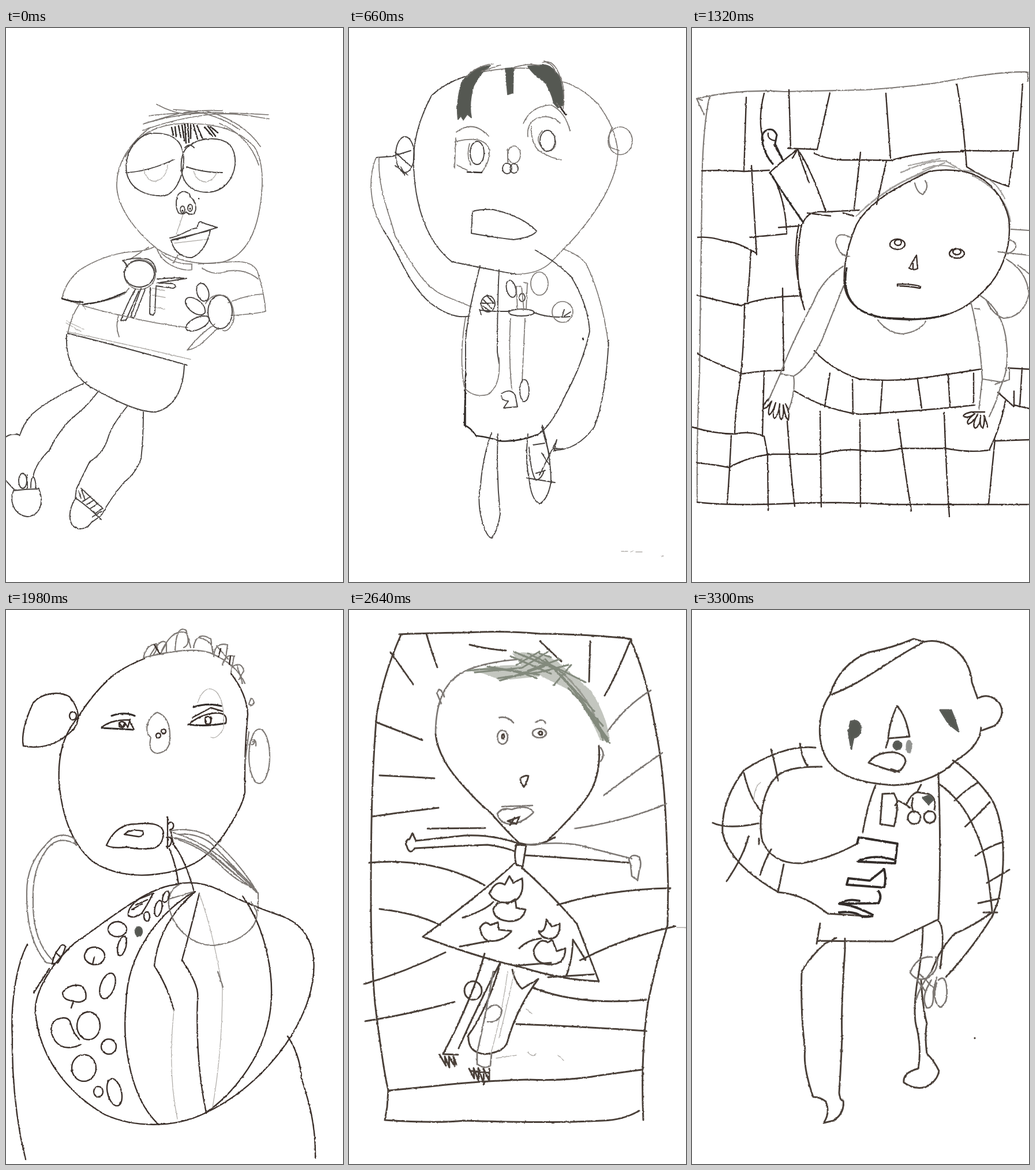
Write an HTML page without scripts that moves like this. It is 584 px wide and 958 px high and loops after 3.96 s.

```html
<!DOCTYPE html>
<html lang="en">
<head>
<meta charset="utf-8">
<title>Six pencil drawings</title>
<style>
html, body { margin: 0; width: 100%; height: 100%; overflow: hidden; background: #fff; }
svg { display: block; width: 584px; height: 958px; fill: none; stroke-linecap: round; stroke-linejoin: round; }
.page { --w: 1.9px; stroke: #47423f; stroke-width: var(--w); filter: url(#grain); visibility: hidden; animation: show 3960ms step-end infinite; animation-delay: calc((var(--i) - 6) * 660ms); }
@keyframes show { 0% { visibility: visible; } 16.666%, 100% { visibility: hidden; } }
.ink { --w: 2.4px; stroke: #3a2f2a; }
.crayon { --w: 3px; stroke: #4a4039; }
.light { stroke: #b2afab; stroke-width: 1.3px; }
.soft { stroke: #7d7874; stroke-width: calc(var(--w) * .9); }
.bold { stroke: #332d2a; stroke-width: calc(var(--w) * 1.3); }
.shade { fill: #555852; stroke: #5c5e59; }
.green { stroke: #838a7d; }
.wash { fill: #a3a89d; stroke: none; opacity: .65; }
</style>
</head>
<body>
<svg viewBox="0 0 584 958">
<filter id="grain" filterUnits="userSpaceOnUse" x="0" y="0" width="584" height="958" color-interpolation-filters="sRGB">
  <feTurbulence type="fractalNoise" baseFrequency=".2" numOctaves="2" seed="4"/>
  <feDisplacementMap in="SourceGraphic" scale="2.5" xChannelSelector="R" yChannelSelector="G"/>
</filter>

<!-- reclining figure -->
<g class="page" style="--i:0">
  <path class="soft" d="M250 172C215 198 190 235 192 275C194 310 222 350 262 382C290 400 330 411 370 406C412 398 432 360 440 310C448 260 443 225 430 205C405 178 370 165 310 165C270 166 250 178 240 184C225 195 215 210 207 222"/>
  <path class="soft" d="M261 132Q290 148 320 150M240 165C280 155 300 140 375 143M237 177C280 162 310 155 350 150S420 152 456 157M247 152Q320 142 455 150M345 143Q410 160 441 205M370 165Q420 185 438 237M238 166Q310 143 385 147M290 141Q360 143 405 176"/>
  <path class="bold" d="M287 172l3 13M293 171l2 17M299 169l4 20M305 168l4 27M310 167l2 32M315 166l2 32M320 168v23M325 168l7 24M331 169l9 21M344 171l13 15M350 170l13 17M355 171l12 10"/>
  <path d="M250 182C220 190 205 220 209 250C215 280 245 292 275 290C295 285 308 255 308 225C306 195 290 180 250 182M318 203C300 215 300 250 312 268C330 290 365 288 382 270C400 250 402 220 388 202C370 186 335 190 318 203M211 250Q250 247 292 227M313 240Q340 250 375 250M310 207q8-9 16 0"/>
  <path class="light" d="M238 243q6 22 20 22q20-4 22-28M325 247q5 19 22 19q14-3 19-18M307 322L295 357M292 372L352 365M253 450l22 4M254 462l22 4M255 482l20 4M105 507L135 521M133 478l5 9M105 525Q200 545 320 573M104 510L130 525"/>
  <path d="M297 290C305 278 315 282 320 292C328 300 332 312 326 321Q318 324 312 318Q308 324 299 320Q292 308 297 290"/>
  <ellipse cx="306" cy="314" rx="4" ry="6"/><ellipse cx="319" cy="311" rx="4" ry="6"/><path class="bold" d="M334 295h.1M306 315v1M319 312v1"/>
  <path d="M284 363C305 360 320 345 331 346Q334 330 341 337L366 345Q340 353 310 362L288 367M286 367C290 385 305 398 322 397C340 390 350 370 354 350L288 366"/>
  <path class="soft" d="M262 383Q270 405 295 414Q310 420 322 418V408Q290 409 270 390M298 393l-8 13M333 408Q385 404 402 404Q432 405 437 425Q447 455 450 490Q430 495 390 497M340 415Q360 430 385 420Q415 416 437 434M385 475Q420 461 446 460"/>
  <path class="soft" d="M258 378Q240 387 215 387Q170 392 128 418Q102 440 97 468L130 478Q170 476 205 460L213 450M247 379L215 400"/>
  <path class="bold" d="M97 468Q115 474 133 474M133 478Q170 475 206 457"/>
  <path d="M211 413L203 402Q230 395 247 400Q259 406 260 422"/>
  <ellipse class="soft" cx="232" cy="426" rx="27" ry="26"/><ellipse cx="231" cy="425" rx="26" ry="23"/>
  <path d="M262 434Q290 431 313 433L262 441L290 442Q297 447 290 450L260 446M250 449L249 494Q256 500 258 490L260 448M242 450L222 501L216 500L234 450M224 452Q208 480 199 506L208 505L230 455"/>
  <path class="soft" d="M128 476Q112 500 107 528M133 480Q170 491 200 497Q260 512 315 518M195 497Q189 515 196 534"/>
  <path d="M107 528Q200 551 314 583M105 530C103 570 115 600 145 620C190 645 230 665 260 664C295 655 308 620 309 582"/>
  <ellipse cx="371" cy="491" rx="21" ry="29"/><path class="soft" d="M346 476Q360 455 382 464Q398 480 394 508Q385 527 376 523"/>
  <ellipse cx="341" cy="457" rx="10" ry="16" transform="rotate(-18 341 457)"/><ellipse cx="328" cy="481" rx="20" ry="11" transform="rotate(38 328 481)"/><ellipse cx="332" cy="511" rx="22" ry="10" transform="rotate(-25 332 511)"/>
  <path class="soft" d="M362 512Q335 530 314 557Q330 555 345 540L368 518"/>
  <path d="M140 612C100 630 65 650 45 668Q30 685 24 704Q10 700 0 707M161 627Q140 655 120 670Q95 690 75 730Q50 755 47 776M0 783L14 798M13 800C5 820 15 843 38 845C60 842 66 820 57 797Q35 797 13 800"/>
  <ellipse cx="29" cy="783" rx="7" ry="13"/><path d="M43 795Q43 773 49 778Q53 790 51 795M37 796V773"/>
  <path d="M211 653Q185 685 178 705Q170 735 145 750Q130 780 122 797M238 664Q238 710 234 745Q225 770 205 785Q180 815 165 843M122 812C112 825 106 845 115 860C125 870 140 867 148 855L165 843M122 797L120 814"/>
  <path d="M121 813Q145 830 165 850M130 796L168 831M126 800l4 13M131 799l6 17M147 810l-14 9M153 816l-13 8M160 822l-14 9M167 831l-13 9M166 836l-16 9"/>
</g>

<!-- figure with raised arm -->
<g class="page" style="--i:1">
  <path d="M201 84Q165 96 143 117C120 160 110 200 112 240C115 310 135 370 178 404Q230 415 290 426"/>
  <path class="soft" d="M290 426Q330 425 350 405L372 382Q410 345 440 295Q465 250 466 215Q462 170 430 130Q400 100 367 92M201 84Q270 62 345 73"/>
  <path class="shade" d="M245 65Q212 68 195 95Q185 130 189 158L194 152L198 159L205 149L212 155Q207 130 216 100Q227 78 245 65ZM271 70L285 69L284 112L275 115ZM310 66Q320 82 338 92Q350 108 355 130L362 138L372 133Q372 110 365 85Q350 62 335 64Z"/>
  <path class="soft" d="M204 85Q220 65 250 62M284 69Q310 60 330 65M335 60Q355 52 366 85Q375 100 371 140M360 130L375 150M230 75L262 64M338 57q16 5 20 20"/>
  <ellipse cx="97" cy="219" rx="16" ry="31"/><ellipse class="soft" cx="470" cy="195" rx="21" ry="24"/><path class="soft" d="M456 172Q446 192 454 207L468 212"/>
  <path d="M107 212L75 222L47 224M80 215L107 239M80 238L102 254M90 240l7 15"/>
  <path class="soft" d="M47 224C32 260 36 310 60 350M52 225C50 280 70 320 80 360C110 410 130 450 170 465L212 482"/>
  <path d="M60 350C85 385 100 440 140 475Q180 505 209 498"/>
  <path class="soft" d="M186 180Q215 158 242 187M185 190L183 243M186 196Q235 185 243 210Q244 235 229 250L205 249M187 237l18 9M302 165Q315 135 350 133Q375 145 383 178M310 188C305 150 350 145 366 165M316 170Q315 200 330 213Q350 225 368 228M335 178Q318 195 342 213Q360 212 358 195"/>
  <path class="bold" d="M205 249L230 250M366 137L376 150"/>
  <ellipse cx="222" cy="216" rx="12" ry="20"/><ellipse cx="344" cy="195" rx="13" ry="18"/><path class="soft" d="M209 200q-6 20 2 36M275 209V232"/>
  <ellipse class="soft" cx="286" cy="219" rx="11" ry="15"/><ellipse cx="274" cy="243" rx="8" ry="9"/><ellipse cx="286" cy="243" rx="7" ry="8"/>
  <path d="M214 317L212 355Q250 362 285 366Q320 361 325 351Q300 325 250 314Q230 313 214 317"/>
  <path class="soft" d="M371 382Q405 395 413 412Q440 470 450 550"/><path d="M450 540Q445 640 425 690Q395 730 357 730"/>
  <path d="M323 384Q360 405 385 430Q415 480 417 525Q405 580 375 635Q350 690 327 703M202 690L202 540Q206 500 212 475Q222 430 227 412M260 418Q257 480 257 560L260 580"/>
  <path class="bold" d="M327 703Q290 717 260 714Q245 708 220 705Q210 690 200 687L202 600"/>
  <path class="soft" d="M260 570Q264 620 240 634Q215 640 200 622Q190 570 202 500"/><path class="bold" d="M405 537l1 2"/>
  <ellipse cx="241" cy="477" rx="12" ry="14"/><path d="M231 476l20 0M233 470l14 15M240 464l11 12M232 481l12 8M226 486l3 10M228 488l26 2M256 490h22M320 492Q350 503 383 499M369 500l4-13M373 498l11-7"/>
  <ellipse cx="299" cy="492" rx="22" ry="6"/><ellipse class="soft" cx="370" cy="491" rx="18" ry="18"/><ellipse class="soft" cx="330" cy="442" rx="15" ry="20"/><ellipse cx="281" cy="451" rx="8" ry="15" transform="rotate(-14 281 451)"/><ellipse cx="300" cy="466" rx="5" ry="7"/>
  <path class="soft" d="M290 447L292 486L303 487L299 447ZM303 440L309 441L307 487M280 502Q276 560 282 625M305 502L300 612"/>
  <ellipse cx="304" cy="627" rx="8" ry="19"/><path d="M265 632Q280 622 288 635L292 655L268 657L276 645Q265 645 264 636"/>
  <path d="M247 700Q232 740 228 790Q222 820 230 850Q238 880 247 882Q258 870 262 840Q255 770 258 702M310 703Q305 750 312 778Q315 815 330 823Q345 815 350 785Q350 740 335 687M308 778L357 786M319 721l20-3M324 770l16-5M360 712l-5 20"/>
  <path d="M360 713L330 773M334 690Q342 720 348 740M334 735L347 755M312 725Q315 770 324 782Q334 780 338 765M354 727L372 728"/>
  <path class="light" d="M473 905h10M488 906l5-2M496 906h12M541 913h4"/>
</g>

<!-- figure among tiles -->
<g class="page ink" style="--i:2">
  <path class="soft" d="M8 122Q80 105 160 110L300 107Q400 100 440 92Q530 75 582 76V92M30 120Q17 180 17 300Q15 500 13 600Q8 700 9 820M8 122L21 150M8 122L18 125"/>
  <path d="M9 820Q60 826 150 823Q250 818 350 824L584 824M94 120L90 248M125 113Q113 160 124 195M168 107L171 208M239 112L217 210L166 208M336 113L344 225M459 97Q470 160 476 240M573 97L565 212Q520 213 466 212M476 240Q510 262 549 274L557 216"/>
  <path d="M17 247Q60 245 90 248L134 246M103 237Q108 320 112 392M9 362Q30 360 55 368Q80 370 112 390M100 362L164 356Q163 310 147 270M150 345L190 342M212 217Q240 230 280 228L344 229Q400 213 470 214M292 215L281 312M337 230L320 305M102 385Q100 430 96 473M9 462Q60 475 85 480Q120 465 188 463M157 450L159 592Q120 592 88 598Q40 580 9 563"/>
  <path d="M91 478Q90 560 82 620Q75 660 74 700M125 593L122 706M0 690Q40 702 75 702Q100 696 125 706L131 738M68 705Q65 770 61 822M9 752Q40 755 64 760Q100 740 140 737L225 737Q260 727 290 730Q330 735 362 727L440 727Q480 735 515 730Q535 690 543 645"/>
  <path d="M131 738L132 834M165 680Q172 780 178 827M222 663L224 828M291 678L292 828M357 677Q365 740 380 835M437 665Q440 760 446 845M525 712L514 823M525 714L584 712M548 588L584 590M572 588L568 655M530 630L558 655V628M558 652L584 658"/>
  <path d="M212 558Q240 590 290 607Q350 612 400 605Q450 598 500 590M178 628Q230 660 290 668Q400 662 490 652M239 597L230 655M278 608L279 668M330 610L326 668M391 608L398 657M444 600L447 655M488 597V648"/>
  <path d="M185 340Q173 400 190 465M190 340Q178 400 187 460L195 487M192 338Q200 315 230 318L290 315M200 320L240 325M262 320l18 5"/>
  <path class="soft" d="M262 412Q225 435 210 475Q170 550 153 598L132 645M265 440Q245 490 225 540Q200 590 176 602Q180 625 168 660M153 598L176 602"/>
  <path d="M132 642Q120 655 125 658Q130 658 138 645Q130 665 134 669Q140 665 145 648Q138 672 143 675Q150 670 152 650Q150 675 155 677Q160 670 158 652Q162 675 167 678Q170 665 162 650"/>
  <path d="M135 250Q150 235 183 210Q205 240 232 318M184 215L203 268M157 228L142 202M145 195Q130 193 132 182M174 225l9-15"/>
  <path class="bold" d="M135 250Q160 290 192 335M147 185Q140 170 127 178Q118 185 123 202Q128 222 140 235M147 185L144 200L158 230"/>
  <path class="soft" opacity=".7" d="M362 250Q410 228 440 230L470 248M285 325Q340 270 438 233M290 320Q350 265 411 248M375 238L430 226M470 246Q520 250 542 295M486 255Q545 285 552 335M300 310Q350 268 400 250M400 245Q430 232 455 242"/>
  <path d="M411 248C370 268 310 295 285 340C268 380 262 415 264 445C270 490 315 502 360 502C430 508 470 490 500 460C535 430 555 380 549 330C540 290 510 255 470 248Q440 243 411 248"/>
  <path class="bold" d="M268 415C258 470 285 500 350 503Q400 507 440 496"/>
  <path class="soft" d="M386 268Q390 285 400 288Q412 275 404 264M275 362Q250 350 249 370Q255 395 273 395M549 367Q562 367 561 380Q555 390 542 390M322 505Q340 528 365 529Q395 525 405 507"/>
  <ellipse cx="356" cy="374" rx="13" ry="9"/><ellipse cx="357" cy="371" rx="6" ry="5"/><ellipse cx="459" cy="390" rx="13" ry="8"/><ellipse cx="459" cy="387" rx="7" ry="5"/>
  <path d="M389 393L376 415Q383 420 391 416ZM383 407v9M356 443Q380 442 396 447L395 450Q375 446 356 446Z"/>
  <path class="soft" d="M483 473Q500 540 503 607L497 660M500 463Q540 490 545 545Q550 590 535 620L525 650L515 672M503 607L535 612M490 485l8 1M545 400Q580 420 584 460Q575 500 540 502Q520 495 510 470M553 348L584 350M530 387L584 393M565 410L584 425M550 587V608L525 616"/>
  <path d="M484 664Q468 668 471 672Q480 675 490 667Q473 680 479 685Q490 680 495 668Q484 688 491 692Q500 688 500 670Q498 690 504 692Q508 680 506 670Q512 685 512 690M484 664h23"/>
</g>

<!-- watermelon -->
<g class="page ink" style="--i:3">
  <path d="M240 84Q200 100 180 118Q150 145 125 185C95 220 90 260 92 300C97 350 110 400 150 435C180 455 220 462 260 457C320 450 350 430 380 385C400 355 412 330 414 315Q413 240 419 180Q417 145 390 110"/>
  <path class="soft" d="M238 84Q242 60 260 59Q265 65 255 78M250 78Q270 45 278 58L268 75M270 70Q290 30 313 40Q320 60 308 65M293 70Q295 25 312 35L320 65M325 65Q330 35 355 50L358 72M335 48Q362 55 358 75M360 80Q362 55 384 60L380 88M365 62L385 85M375 95Q380 75 395 80L390 108M392 98Q408 88 412 105L404 120M240 82Q330 60 360 77Q400 95 414 127M260 62l7 15M278 57v15M400 95l10 32"/>
  <path d="M257 60l9 15M372 67l-4 14M389 80l-2 14"/>
  <path d="M110 150C90 138 55 145 45 165Q25 210 30 235Q80 245 118 205Q135 180 110 150"/><ellipse cx="116" cy="183" rx="6" ry="7"/>
  <ellipse class="soft" cx="439" cy="253" rx="18" ry="47"/><path class="soft" d="M421 233q4-12 10-8q0 8-6 8M428 228q6-6 5 7M421 163Q425 145 430 160Q427 168 421 163M414 265L421 210"/>
  <path class="bold" d="M183 183Q205 175 223 183M166 204L221 207M325 168Q350 160 373 166M316 198Q345 202 380 196"/>
  <path d="M166 203Q180 190 213 190L222 207M196 195l6 8l4-8l5 8l4-14M316 199Q335 180 365 178Q385 178 381 195M346 185q-2 13 4 14q7-2 5-14M323 186L355 169L375 175"/>
  <ellipse cx="201" cy="198" rx="5" ry="5"/><ellipse cx="350" cy="191" rx="5" ry="7"/>
  <path class="light" d="M332 160Q345 125 365 142Q380 160 377 205Q365 225 355 220"/>
  <path class="soft" d="M262 177C245 185 238 210 251 220Q245 245 262 248Q285 245 284 220Q285 185 262 177"/><ellipse cx="264" cy="217" rx="4" ry="4"/><ellipse cx="273" cy="210" rx="4" ry="4"/>
  <path d="M174 407Q190 370 225 370Q270 365 273 385Q272 408 255 412Q230 415 210 410Q185 413 174 407M205 388Q215 378 236 382Q242 390 230 392Z"/>
  <path d="M280 358V412M281 370q4-6 9 0q2 8-6 10M278 393q8-2 9 6q-2 12-9 10M283 413Q295 440 299 475M290 405Q310 430 326 487M285 380L290 405"/>
  <path class="soft" d="M284 382Q320 375 350 390Q400 430 435 487M290 385Q360 405 430 480M292 395Q340 410 370 440Q400 470 425 478M300 388Q330 385 355 403L425 475M286 392Q330 400 370 435L437 490V520M355 420L424 480M370 425L432 484"/>
  <path class="soft" d="M121 407L118 395Q90 380 70 405Q35 440 36 490Q35 570 70 610L85 612M121 405Q90 388 70 415Q45 450 47 500Q45 570 80 605"/>
  <path d="M80 612Q83 595 92 585Q98 575 103 582Q100 595 90 610ZM86 592l8 8M75 620L48 662"/>
  <path d="M37 578C15 620 8 690 11 740C10 810 18 870 25 910L34 950M488 737Q510 770 512 810C525 850 537 890 536 948"/>
  <path d="M293 475C240 480 160 550 120 575C70 620 45 670 52 705C60 770 100 830 170 872C220 895 290 897 345 870C430 830 500 750 525 670C545 600 530 550 480 530Q420 510 372 485Q330 465 293 475"/>
  <path d="M325 488C270 520 210 590 208 680C200 760 220 850 265 890M410 495C450 550 470 640 455 710C440 780 390 840 345 870"/>
  <path d="M335 490Q318 560 305 605Q335 650 332 670Q328 780 347 870M328 487Q265 540 257 615Q280 650 291 692"/>
  <path class="light" d="M335 490Q360 560 375 655Q375 760 358 860M291 692Q280 800 297 880"/>
  <path class="soft" d="M300 475Q280 485 282 512C290 550 320 580 360 580C410 575 440 545 434 520L425 505M367 625L376 652M282 500L325 487"/>
  <ellipse cx="193" cy="552" rx="16" ry="13"/><ellipse class="shade" cx="230" cy="556" rx="6" ry="8"/><ellipse cx="244" cy="530" rx="5" ry="8"/><ellipse cx="264" cy="516" rx="6" ry="14" transform="rotate(12 264 516)"/><ellipse cx="277" cy="496" rx="5" ry="10" transform="rotate(20 277 496)"/><ellipse cx="201" cy="581" rx="7" ry="17" transform="rotate(14 201 581)"/><ellipse cx="176" cy="650" rx="12" ry="23" transform="rotate(20 176 650)"/><ellipse cx="143" cy="719" rx="20" ry="24"/><ellipse cx="178" cy="755" rx="13" ry="13"/><ellipse cx="135" cy="792" rx="21" ry="23"/><ellipse cx="160" cy="833" rx="8" ry="9"/><ellipse cx="188" cy="834" rx="12" ry="24" transform="rotate(-14 188 834)"/>
  <path d="M212 528Q210 515 230 500L255 490Q245 510 235 525Q220 535 212 528M225 510l20-9M218 518l18-10M153 600L150 613Q135 608 136 597Q140 582 155 583Q173 587 171 602Q165 615 150 613M113 688L117 676Q98 675 98 661Q112 645 130 650Q141 658 138 673Q128 682 113 675M131 751Q100 765 85 745Q70 720 88 708Q108 700 112 715Q118 735 127 742"/>
</g>

<!-- flame dress -->
<g class="page crayon" style="--i:4">
  <path d="M90 43Q60 110 48 180C38 300 38 420 38 500Q38 600 45 680Q60 800 68 830L66 860L62 882M62 882Q150 888 200 883Q350 888 440 883Q475 882 503 866M487 50Q515 110 530 200C545 270 550 340 553 480L552 545Q530 620 518 680Q505 770 510 882"/>
  <path d="M87 42Q130 40 200 39Q270 35 330 41Q420 42 489 50M68 831L140 824Q230 814 310 812Q380 815 440 804L507 795"/>
  <path d="M72 73L111 128M134 41Q142 70 153 99M209 60Q240 68 272 70M331 54L368 89M418 54L416 124M487 54Q465 110 443 148M47 194L127 225M53 286Q100 288 148 291M41 357Q90 350 155 342M136 378L235 377M35 437C110 430 180 445 235 476M53 517Q120 525 158 545M26 647Q100 625 167 592M28 711Q100 700 182 678M361 510Q450 483 557 481M318 653Q400 685 515 674M290 716Q400 720 515 728"/>
  <path class="soft" d="M523 139Q480 165 448 210M543 247Q495 280 442 320M550 335Q480 365 391 378"/>
  <path d="M565 547Q480 565 400 606"/>
  <path class="soft" d="M150 215C150 150 170 115 215 100Q250 88 300 85M373 112Q420 155 436 210"/>
  <path d="M150 215Q155 255 190 295Q225 335 245 350Q275 385 295 403Q320 410 343 400Q395 350 415 320Q437 285 433 235"/>
  <path class="wash" d="M212 106Q260 90 325 98L330 115L262 122Q235 108 212 106ZM283 75Q320 68 360 88L420 140Q450 190 452 228L435 225Q415 175 385 140L300 98Z"/>
  <path class="green" d="M205 105Q270 95 325 118M218 108L300 100M240 98L330 112M258 118L325 108M262 122L340 97M280 80L350 110M285 72L365 105M290 95L330 72M300 100L345 72M310 105L365 85M320 110L380 95M310 75L410 125M340 85L395 145M355 130L385 95M365 110L425 175M380 135L440 200M390 140L448 222M400 150L452 230M405 165L447 228M430 190L440 225M330 75L350 82M325 82L375 112M300 78L355 100M415 180L450 228"/>
  <path class="soft" d="M160 162L152 143Q158 130 165 150M436 238Q445 250 436 262M260 186Q275 183 285 195M324 194Q335 186 341 196"/>
  <ellipse class="soft" cx="266" cy="220" rx="9" ry="12"/><ellipse cx="267" cy="219" rx="2" ry="4"/><ellipse class="soft" cx="330" cy="213" rx="12" ry="8"/><ellipse cx="332" cy="213" rx="3" ry="3"/>
  <path d="M297 291Q305 285 311 287Q308 300 303 306Q296 298 297 291M343 400L357 393"/>
  <path class="soft" d="M257 352Q265 340 282 345Q310 335 320 350Q305 365 285 370Q262 372 257 352M265 340L318 338"/>
  <path d="M275 365L295 358L290 370ZM279 372l8-13"/>
  <path d="M294 404Q250 388 200 390L116 399L110 386L105 396Q95 400 100 408Q105 425 114 412Q180 408 240 406Q270 410 288 418M290 406Q285 425 290 440L301 444L307 407ZM303 424Q400 430 485 437"/>
  <path class="soft" d="M308 406Q370 400 400 407L490 430M485 432Q490 420 503 427Q508 440 503 450L500 468L490 460L488 440Z"/>
  <path d="M288 437Q230 490 128 565M300 446Q350 490 395 543L433 642M128 565Q220 600 300 618Q370 640 433 642M388 570Q387 610 375 636M388 570L410 605M345 635L425 630"/>
  <path d="M243 490Q255 465 270 475L278 460L285 472L300 464Q305 500 280 505Q255 510 243 490M197 532Q235 520 250 505M250 517Q258 500 275 508L288 500L290 515L306 518Q300 540 275 538Q250 535 250 517M227 550Q235 535 245 545L258 540L260 553L282 555Q265 575 243 572Q230 570 227 550M192 582L245 572M329 555Q340 560 342 535L352 548L365 542Q367 570 345 568Q330 565 329 555M295 585Q310 570 333 568M320 588Q330 565 345 575L352 570L360 590L375 585Q375 615 345 613Q320 610 320 588M290 615L350 610"/>
  <path d="M235 594Q215 670 163 768M262 610Q225 680 190 758M163 768L189 769M262 612Q240 690 207 735Q205 765 235 768Q270 765 275 745Q290 690 328 638M283 622Q288 645 300 655L328 638"/>
  <path class="soft" d="M250 625Q235 710 222 765L222 785Q235 795 245 788L247 768"/>
  <path class="light" d="M275 625Q265 700 245 770M287 625Q270 700 260 740M307 690l10 8M310 765q10 10 14 2M255 775L290 770M362 770l10 9M568 549h16"/>
  <ellipse cx="215" cy="658" rx="15" ry="16"/><path class="soft" d="M240 690Q255 675 265 692Q262 715 240 712"/>
  <path d="M157 769l11 19l-2-16l8 19l-1-19l10 17l-2-17l5 14M208 793l9 17l-1-18l9 23l-1-23l10 28l-1-27l10 21V793M211 797L242 800"/>
</g>

<!-- striped sleeves -->
<g class="page crayon" style="--i:5">
  <path d="M403 55L384 50C365 58 335 68 307 73C275 85 250 110 239 147C220 172 213 225 235 260C255 290 300 300 350 303C400 302 440 280 455 262Q500 235 501 203M403 55C440 46 482 78 485 125L495 153Q515 142 532 160Q545 180 525 200L503 208M242 146C300 125 350 80 403 55"/>
  <path d="M355 166Q342 195 340 222L377 219Q370 180 355 166M306 264Q320 245 350 246Q370 250 370 262Q365 280 350 279Q325 272 306 264M340 225l-4 13M345 275l14 5"/>
  <path class="shade" d="M275 193Q287 188 292 200Q294 218 280 221L276 240L271 210ZM430 173L449 173L455 188L462 210L445 197Z"/>
  <circle class="shade" cx="356" cy="234" r="7"/><ellipse class="shade" cx="376" cy="236" rx="4" ry="10" opacity=".65"/>
  <path d="M214 238Q160 232 90 277Q50 330 53 385Q65 440 150 488Q195 492 235 525L313 530M225 271Q170 270 150 285C120 310 115 370 122 400Q140 440 190 438Q240 430 288 403"/>
  <path d="M187 231Q190 255 200 270M137 241Q145 270 149 295M90 282Q100 325 119 347M36 368Q60 380 115 369M98 391Q90 425 60 469M137 414Q125 435 118 458M159 440L149 488M116 395v10"/>
  <path class="light" d="M107 330q1-25 12-32"/>
  <path d="M318 303Q303 340 296 384M427 282L429 350Q431 450 427 535Q400 548 348 573Q290 573 217 572M222 542L216 577M330 318L326 370L350 374Q357 350 355 328L350 317Z"/>
  <path class="bold" d="M286 404L289 393L356 404L352 438L287 435Q312 421 350 432M333 448Q337 465 333 480L268 475L271 464L308 468L333 448M323 486Q330 495 323 507L256 508Q270 498 290 503M255 508Q280 510 313 527Q310 532 295 530Q280 520 255 523"/>
  <path d="M352 338l6-8l10 5l10 7M372 335Q380 318 390 315L397 302M383 325Q378 340 385 350M390 315L410 318Q425 325 420 345"/>
  <circle cx="385" cy="359" r="11"/><circle cx="412" cy="358" r="10"/><path class="shade" d="M400 325L412 320L418 328L410 336Z"/>
  <path d="M452 260Q490 285 520 328C542 370 545 440 530 505L520 530Q490 580 440 635M427 300Q470 330 490 380C510 420 515 470 520 520M455 330Q475 310 495 299M473 375Q500 350 516 332M491 425Q515 408 540 401M511 472L550 449M496 507L533 499M505 523h24M520 523Q490 545 455 560Q430 585 415 625"/>
  <path d="M265 568V590Q258 690 260 740Q258 790 255 835Q257 850 262 848Q265 870 245 883L228 887Q240 870 232 850Q222 842 210 842Q192 790 196 760Q188 700 190 625Q205 600 230 577L250 567"/>
  <path d="M400 548Q400 590 390 645Q382 700 390 725Q398 760 392 793Q365 800 367 817Q385 830 405 825Q425 815 428 797Q420 780 407 767Q403 735 407 715Q400 690 397 640M427 538Q440 550 430 620"/>
  <path class="soft" d="M415 600Q390 598 378 627Q390 645 410 635Q430 620 423 600M415 625Q395 650 388 675M415 640Q395 670 407 688Q420 690 418 660L424 635M424 645Q415 675 430 687Q445 680 441 650Q438 630 427 640M395 630L420 655M390 640l15 20"/>
  <path d="M490 740v.5"/>
</g>
</svg>
</body>
</html>
```
